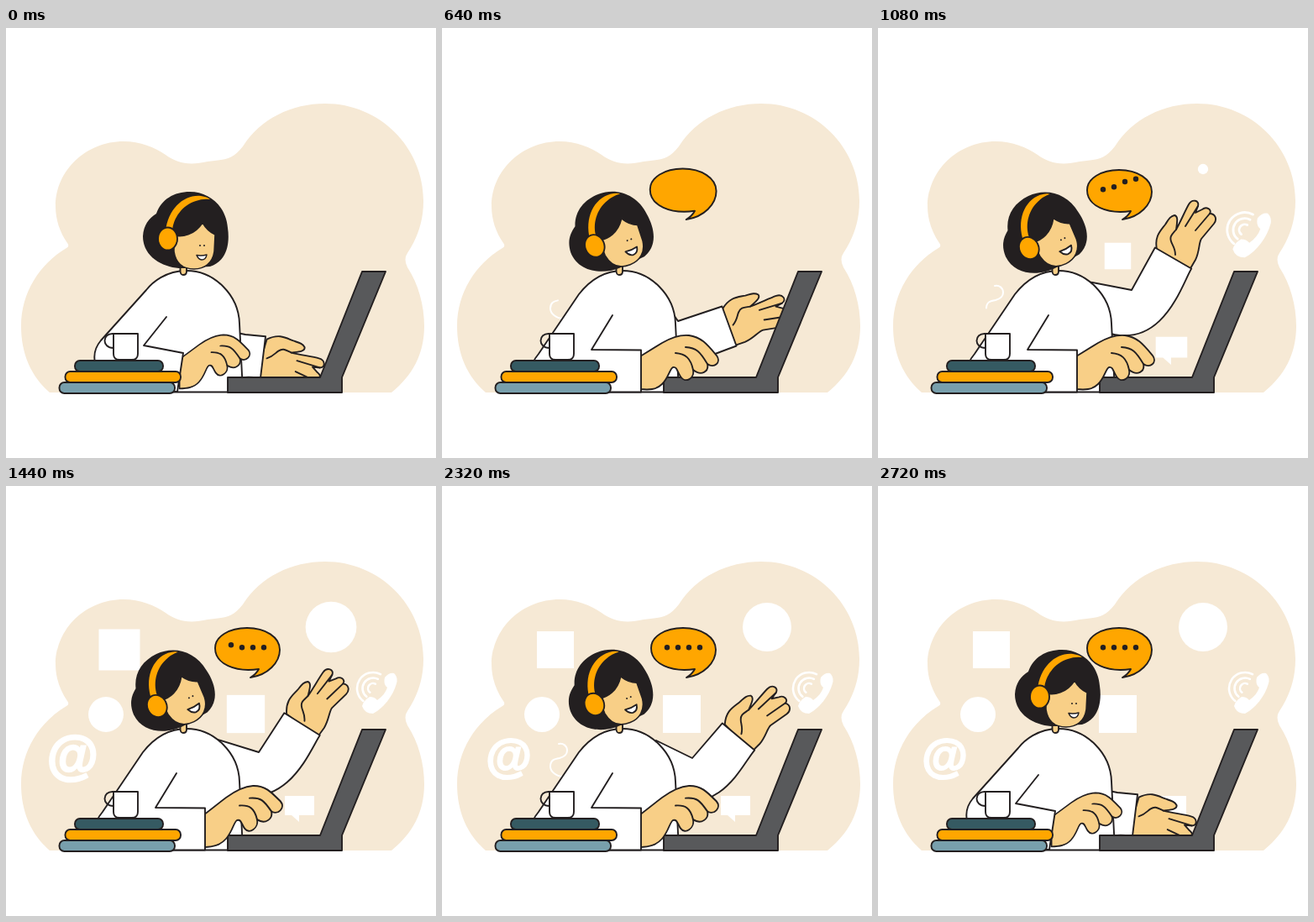
Animation of 512 by 512 pixels, one loop 2.88 s. Source, as an HTML page:

```html
<!DOCTYPE html>
<html lang="en">
<head>
<meta charset="utf-8">
<title>Online support</title>
<style>
html, body { margin: 0; width: 100%; height: 100%; overflow: hidden; background: #fff; }
svg { display: block; width: 100vw; height: 100vh; }
.ink { stroke: #231f20; stroke-width: 1.9; stroke-linejoin: round; stroke-linecap: round; }
.line { fill: none; }
.skin { fill: #f8cf87; }
.white { fill: #fff; }
.orange { fill: #ffa600; }
.dark { fill: #231f20; }
.wave { fill: none; stroke: #fff; stroke-width: 2.6; stroke-linecap: round; }
.at { font: bold 56px "Liberation Sans", Arial, sans-serif; text-anchor: middle; stroke: #fff; stroke-width: 2.2; }
</style>
</head>
<body>
<svg viewBox="0 0 512 512">
  <path fill="#f6e9d5" d="M52 434C30 415 18 388 18 355C18 315 40 281 72 262Q76 260 73 256C64 243 59 228 59 212C59 170 95 135 140 135C160 135 177 142 190 151C204 161 218 164 240 159C258 156 268 159 282 141C303 108 340 90 380 90C445 90 497 142 497 206C497 230 490 250 478 268Q473 275 478 285C491 305 498 330 498 355C498 388 484 414 459 434Z"/>

  <g class="white">
    <g id="phone">
      <path d="M451 228Q456 222 462 223Q467 228 465 235C461 250 449 265 437 271Q427 271 424 262Q426 255 433 251Q439 251 442 255C448 251 452 246 454 240Q449 236 451 228Z"/>
      <g id="waves" class="wave"></g>
    </g>
    <path id="chat" d="M332 369H367V392H349V400L340 392H332Z"/>
    <rect id="photo" x="263" y="249" width="45" height="45"/>
    <circle id="call" cx="387" cy="168" r="29"/>
    <rect id="page" x="113" y="173" width="44" height="44"/>
    <text id="at" class="at" x="79.500" y="340">@</text>
    <circle id="post" cx="119" cy="272" r="21"/>
  </g>

  <g class="ink">
    <g id="farHand">
      <path class="skin" d="M332 264C329 248 336 242 342 234C346 228 348 224 353 223C358 224 356 232 355 240C360 231 366 217 370 210C374 203 383 205 381 212L378 220L386 216C391 212 398 216 395 221C402 221 404 228 400 233L385 251C382 255 383 266 378 276L371 288Z"/>
      <path class="line" d="M381 212L366 236M395 221L378 241M355 240C350 246 347 248 349 254C350 258 354 262 354 270"/>
    </g>
    <path id="farSleeve" class="white"/>
  </g>

  <path id="steam" class="wave" style="stroke-width:2" pathLength="100" d="M145 346C136 346 129 340 129 334C129 326 134 325 140 324C147 322 149 318 149 315C149 309 144 306 139 307"/>

  <g class="ink">
    <path id="body" class="white"/>
    <path fill="#58595b" d="M264 416H374L424 290H452L400 416V434H264Z"/>
    <g id="nearHand">
      <path class="skin" d="M236 391L262 375C274 368 283 365 294 366C309 368 316 377 327 390C333 398 324 406 316 400C318 409 309 415 299 407C301 417 290 424 284 415C280 409 280 403 275 404C271 406 270 416 262 424C255 431 246 431 236 430Z"/>
      <path class="line" d="M290 380C303 381 307 385 316 400M278 387C290 388 296 393 299 407"/>
    </g>
    <path id="nearFill" class="white" stroke="none"/>
    <path id="nearSleeve" class="line"/>
    <rect x="82" y="396" width="105" height="13" rx="6" fill="#355a62"/>
    <rect x="70.500" y="409" width="137.500" height="13" rx="6" class="orange"/>
    <rect x="63.500" y="422" width="137.500" height="13" rx="6" fill="#789fac"/>
    <path class="line" d="M128 364C114 363 114 381 128 381"/>
    <path class="white" d="M128 364H157V388Q157 395 150 395H135Q128 395 128 388Z"/>
    <path class="skin" d="M207.500 284V290Q208 294 211 294Q215 294 215 290V284"/>
  </g>

  <g id="head">
    <path class="dark" d="M212 286C190 287 163 274 163 248C164 234 170 227 179 221C185 204 200 195 219 195C242 195 262 212 264 238C267 258 262 278 243 284Z"/>
    <path class="skin ink" style="stroke-width:1.500" d="M200 247C210 249 224 247 234 232C238 239 244 244 249 246L248 266C246 280 236 287 224 287C210 287 202 279 200 266Z"/>
    <path class="orange" d="M190 242C193 215 212 198 232 200Q240 201 243 204Q234 203 226 206C210 211 199 226 198 242Z"/>
    <ellipse class="orange ink" cx="192.500" cy="251" rx="11.500" ry="13.500"/>
    <circle class="dark" cx="231" cy="259" r="1"/>
    <circle class="dark" cx="236" cy="259" r="1"/>
    <path id="mouth" class="white ink" style="stroke-width:1.500" d="M227 270.500Q233 271.500 239 270Q238 276 233 276Q229 275.500 227 270.500Z"/>
  </g>

  <g id="bubble">
    <path class="orange ink" d="M301 218C273 222 249 212 249 193C249 179 266 169 287 169C309 169 326 180 326 195C326 210 312 225 291 228Q298 224 301 218Z"/>
    <g id="dots" class="dark"></g>
  </g>
</svg>
<script>
const LOOP = 2880, STEP = 40, LAST = 2720;
const el = id => document.getElementById(id);
const set = (id, name, value) => el(id).setAttribute(name, value);
const clamp = x => Math.max(0, Math.min(1, x));
const rad = deg => deg * Math.PI / 180;

// Smooth curve through keys [time, ...values] without overshooting them
function at(keys, t) {
  const n = keys.length - 1;
  if (t <= keys[0][0]) return keys[0].slice(1);
  if (t >= keys[n][0]) return keys[n].slice(1);
  const i = keys.findIndex(k => k[0] > t) - 1;
  const [a, b] = [keys[i], keys[i + 1]];
  const h = b[0] - a[0], u = (t - a[0]) / h;
  const slope = (j, c) => (keys[j + 1][c] - keys[j][c]) / (keys[j + 1][0] - keys[j][0]);
  const tangent = (j, c) => {
    if (j === 0) return slope(0, c);
    if (j === n) return 0;
    const p = slope(j - 1, c), q = slope(j, c);
    return p * q <= 0 ? 0 : 2 * p * q / (p + q);
  };
  return a.slice(1).map((v, k) => {
    const c = k + 1, d = b[c] - v;
    const m0 = tangent(i, c) * h, m1 = tangent(i + 1, c) * h;
    return v + u * (m0 + u * (3 * d - 2 * m0 - m1 + u * (m0 + m1 - 2 * d)));
  });
}

const popKeys = [[0, 0], [240, 1.12], [520, 1]];
const pop = t => at(popKeys, t)[0];

// id, start, centre
const icons = [
  ["chat", 720, 350, 385], ["phone", 760, 441, 247], ["photo", 960, 285.5, 271.5],
  ["call", 1040, 387, 168], ["page", 1160, 135, 195], ["at", 1200, 80, 325],
  ["post", 1260, 119, 272], ["bubble", 200, 302, 228]
];

const headKeys = [[160, 0], [320, -8], [640, -21], [840, -26], [2160, -26], [2320, -22], [2520, -9], [2700, 0]];

// Far arm: cuff x, y, turn, wrist bend, elbow x, y, shoulder x, y, underside x, y, underside end
const typing = [306, 392, 67, 8, 285, 365, 270, 362, 280, 418, 420];
const reach = [342, 355, 40, 1, 281, 349, 270, 333, 295, 400, 408];
const lift = [358, 318, 22, 2, 292, 332, 260, 310, 325, 392, 380];
const raised = [351.5, 274, 0, 0, 302, 312, 250, 302, 338, 385, 362];
const rest = [352.5, 283.5, 2, 4, 301, 317, 252, 302, 335, 385, 366];
const lower = [353, 298.5, 10, 5, 298, 324, 255, 303, 332, 392, 372];
const farKeys = [
  [360, typing], [640, reach], [800, lift], [1080, raised], [1440, rest],
  [2120, rest], [2320, lower], [2440, lift], [2560, reach], [2700, typing]
].map(([t, pose]) => [t, ...pose]);

// Near arm: 0 = drawn back, 1 = stretched out
const nearKeys = [[160, 0], [320, .65], [460, 1], [2400, 1], [2560, .5], [2700, 0]];
// Near hand: finger lift, size
const handKeys = [[160, -7, .9], [320, -7, .9], [640, 0, 1], [860, -9, 1], [1080, 0, 1], [1400, -9, 1], [2400, -9, 1], [2700, -7, .9]];

function drawHead(t) {
  const tilt = at(headKeys, t)[0];
  set("head", "transform", `rotate(${tilt} 210 284)`);
  set("mouth", "transform", `translate(239 270) scale(${1 - tilt / 90}) translate(-239 -270)`);
}

function drawFarArm(t) {
  const [x, y, turn, bend, ex, ey, px, py, qx, qy, end] = at(farKeys, t);
  const a = rad(30 + turn), dx = 25 * Math.cos(a), dy = 25 * Math.sin(a);
  const bx = x + dx, by = y + dy;
  set("farHand", "transform", `translate(${x} ${y}) rotate(${turn + bend}) translate(-351.5 -274)`);
  set("farSleeve", "d", `M${px} ${py}L${ex} ${ey}L${x - dx} ${y - dy}L${bx} ${by}` +
    `C${bx - dy} ${by + dx} ${qx} ${qy} 270 ${end}Z`);
}

function drawNearArm(t) {
  const k = at(nearKeys, t)[0], [raise, size] = at(handKeys, t);
  const mix = (a, b) => a + (b - a) * k;
  const pt = (ax, ay, bx, by) => `${mix(ax, bx)} ${mix(ay, by)}`;
  set("body", "d", `M282 433.500L278 352C277 318 248 289 215 289C190 289 174 303 ${pt(167, 312, 163, 317)}` +
    `L${pt(113, 372, 115, 388)}Q${pt(103, 384, 110, 394)} ${pt(106, 398, 108, 399)}L150 433.500Z`);
  const elbow = pt(164, 378, 178, 383), top = pt(211, 387, 237, 383.5), low = pt(204, 433, 237, 433.5);
  set("nearSleeve", "d", `M${pt(191, 344, 203, 342)}L${elbow}L${top}L${low}H198`);
  set("nearFill", "d", `M${elbow}L${top}L${low}H150Z`);
  set("nearHand", "transform",
    `translate(${pt(207.5, 410, 237, 408.5)}) skewY(${raise}) scale(${size}) translate(-237 -408.500)`);
}

function drawSteam(t) {
  const s = t < 1500 ? t : t - 1400;
  const head = 100 * clamp((s - 400) / 440), tail = 100 * clamp((s - 960) / 360);
  set("steam", "visibility", head - tail > .5 ? "visible" : "hidden");
  set("steam", "stroke-dasharray", `0 ${tail} ${head - tail} 200`);
}

// Three rounds of hops, one dot after the other
function drawDots(t) {
  const s = t < 840 || t > 2400 ? 0 : (t - 840) % 560;
  [...el("dots").children].forEach((dot, i) => {
    const hop = Math.sin(Math.PI * clamp((s - i * 40) / 240)) ** 2;
    dot.setAttribute("cy", 192.3 - 12.5 * hop);
    dot.setAttribute("r", 3.2 * clamp((t - 650) / 90));
  });
}

function draw(t) {
  for (const [id, start, x, y] of icons) {
    const s = pop(t - start);
    set(id, "visibility", s > 0 ? "visible" : "hidden");
    set(id, "transform", `translate(${x} ${y}) scale(${s}) translate(${-x} ${-y})`);
  }
  drawHead(t);
  drawFarArm(t);
  drawNearArm(t);
  drawSteam(t);
  drawDots(t);
}

const polar = (r, deg) => `${437 + r * Math.cos(rad(deg))} ${241 + r * Math.sin(rad(deg))}`;
el("waves").innerHTML = [6, 12.5, 19].map(r =>
  `<path d="M${polar(r, -62)}A${r} ${r} 0 0 0 ${polar(r, 128)}"/>`).join("");
el("dots").innerHTML = [268, 281, 294, 307].map(x => `<circle cx="${x}"/>`).join("");

const begin = performance.now();
function tick() {
  const t = (performance.now() - begin) % LOOP;
  draw(t < 200 ? 0 : Math.min(LAST, Math.floor(t / STEP) * STEP));
  requestAnimationFrame(tick);
}
draw(0);
requestAnimationFrame(tick);
</script>
</body>
</html>
```
